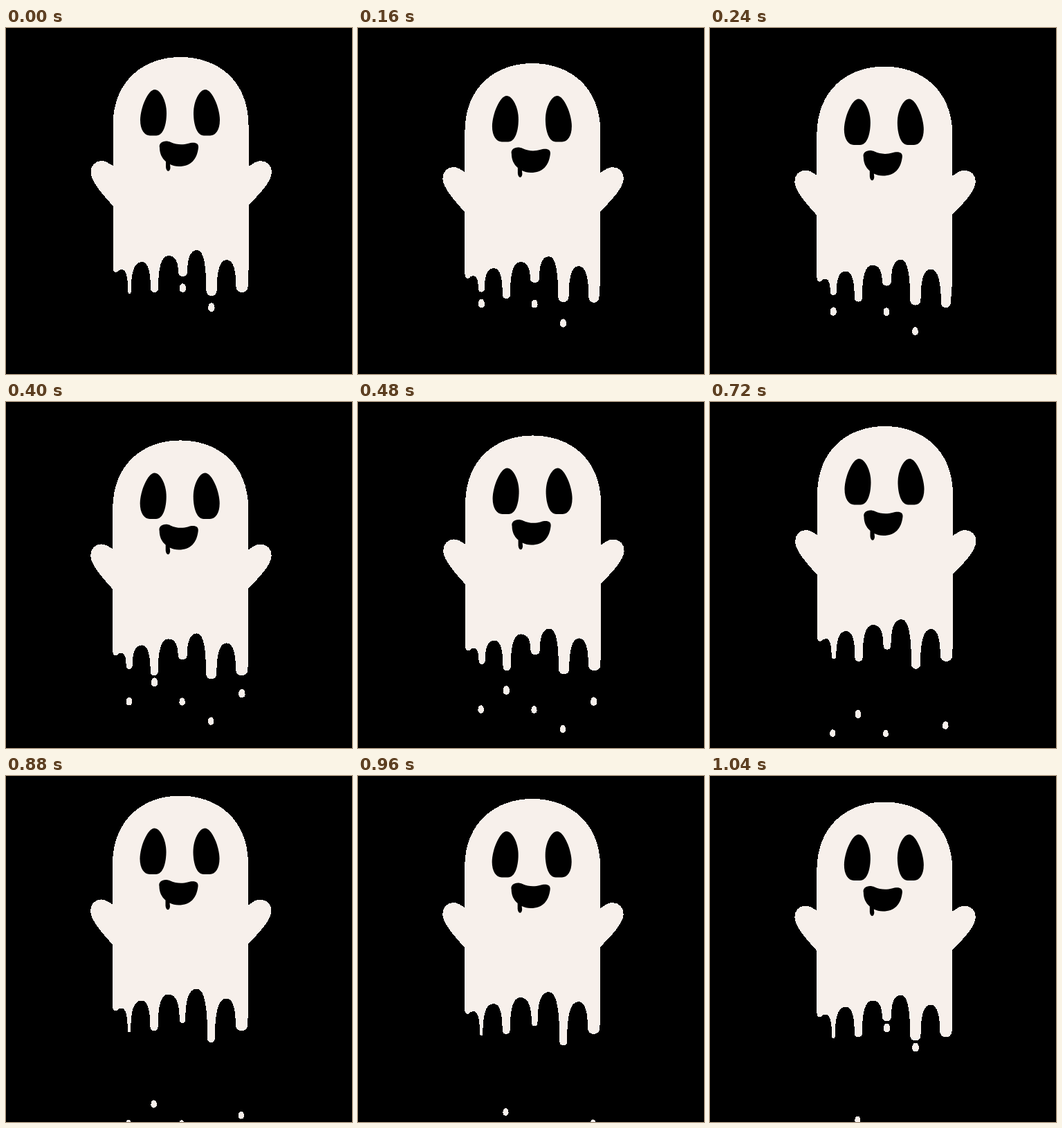
An HTML page that plays this animation: 500 px wide and 500 px high, repeating every 1120 ms.

```html
<!DOCTYPE html>
<html lang="en">
<head>
<meta charset="utf-8">
<title>Dripping ghost</title>
<style>
  html, body { margin: 0; width: 100%; height: 100%; overflow: hidden; background: #000; }
  svg { display: block; width: 100%; height: 100%; }
  .slime { fill: #f7f0eb; shape-rendering: crispEdges; }
</style>
</head>
<body>
<svg viewBox="0 0 500 500">
  <g id="drops"></g>
  <g id="ghost">
    <path id="body" class="slime"/>
    <path id="eye" d="M215 89C205 89 194 116 194 133C194 147 200 155.5 208 155.5L217 155.5C227 155.5 232 140 232 123C232 105 223 89 215 89Z"/>
    <use href="#eye" transform="matrix(-1 0 0 1 503 0)"/>
    <path d="M222 173C220 165 230 161 238 165C246 169 256 169 263 167C272 164 279 166 278 173C276 190 267 200 250 200C245 200 241 199 237 197L237.5 202C237 209 231.5 208 231 201L231 193C225 188 222 181 222 173Z"/>
  </g>
</svg>
<script>
const STEP_MS = 80, STEPS = 14;
const FALL_SPEED = 11.5, DROP_GAP = 9.5;
const STRETCH = 11.5, STRETCH_STEPS = 4;

// Turning points as [step, offset]
const bobKeys = [[-3, -13.5], [4.2, 19], [7, -0.5], [11, -13.5], [18.2, 19]];
const swayKeys = [[0, 0], [5, -0.3], [7, 1.5], [11, -0.5], [14, 0]];

// tip: resting length, arch: height of the gap to its left,
// release: step when the drop lets go, lead: steps of stretching before that
const drips = [
  { x: 178.5, tip: 372.5, arch: 349, release: 1, lead: 8 },
  { x: 214.5, tip: 382, arch: 338, release: 5, lead: 2 },
  { x: 255.5, tip: 359, arch: 329, release: 13, lead: 6 },
  { x: 297, tip: 387, arch: 321, release: 13, lead: 6 },
  { x: 341, tip: 382, arch: 335, release: 4, lead: 4 }
];

const lerp = (a, b, k) => a + (b - a) * k;
const clamp01 = v => Math.min(1, Math.max(0, v));
const wrap = step => (step + STEPS) % STEPS;

function track(keys, t) {
  const i = keys.findIndex(([time]) => time > t);
  const [t0, v0] = keys[i - 1], [t1, v1] = keys[i];
  return lerp(v0, v1, (t - t0) / (t1 - t0));
}

const ghost = document.getElementById("ghost");
const body = document.getElementById("body");
const dropLayer = document.getElementById("drops");

drips.forEach((drip, i) => {
  drip.half = 4.5 + i * 1.05;
  drip.archX = ((i ? drips[i - 1].x : 156) + drip.x) / 2;
  drip.drop = document.createElementNS("http://www.w3.org/2000/svg", "path");
  drip.drop.setAttribute("class", "slime");
  dropLayer.append(drip.drop);
});

function stretchAt({ release, lead }, step) {
  const left = wrap(release - step);
  return left ? STRETCH * clamp01((lead - left) / STRETCH_STEPS) : 0;
}

function bodyPath(step) {
  let d = "M154.5 346L154.5 257C140 241 123 222 122.5 209C122 196 134 188 146 194L154.5 199" +
    "L154.5 140C155 75 200 42 252 42C305 42 350 75 350.5 140L350.5 200L360 194" +
    "C373 188 385 197 384 209C383 223 366 240 350.5 256L350.5 350";
  // Trace the fringe from right to left
  for (let i = drips.length - 1; i >= 0; i--) {
    const drip = drips[i], next = drips[i + 1];
    const stretch = stretchAt(drip, step);
    const tip = drip.tip + stretch;
    const half = drip.half - stretch * 0.2;
    const left = drip.x - half, right = drip.x + half;
    const shoulder = tip - half, round = tip + half * 0.33;
    d += next
      ? `C${lerp(next.archX, right, 0.78)} ${next.arch} ${right} ${lerp(next.arch, tip, 0.38)} ${right} ${shoulder}`
      : `L${right} ${shoulder}`;
    d += `C${right} ${round} ${left} ${round} ${left} ${shoulder}` +
      `C${left} ${lerp(drip.arch, tip, 0.38)} ${lerp(drip.archX, left, 0.78)} ${drip.arch} ${drip.archX} ${drip.arch}`;
  }
  return d + "L163 350C161 354 154.5 355 154.5 346Z";
}

function dropPath(x, y, r) {
  const top = y - r * 1.35, side = y + r * 0.27, bottom = y + r * 1.7;
  return `M${x} ${top}C${x + r * 0.8} ${top} ${x + r} ${y - r * 0.4} ${x + r} ${side}` +
    `C${x + r} ${bottom} ${x - r} ${bottom} ${x - r} ${side}` +
    `C${x - r} ${y - r * 0.4} ${x - r * 0.8} ${top} ${x} ${top}Z`;
}

function drawDrop({ x, tip, release, drop }, step) {
  const age = wrap(step - release);
  const y = tip + track(bobKeys, release) + DROP_GAP + FALL_SPEED * age;
  drop.setAttribute("d", dropPath(x - age * 0.15, y, 4.8 - age * 0.1));
}

function render(ms) {
  const step = Math.floor(ms / STEP_MS) % STEPS;
  ghost.setAttribute("transform", `translate(${track(swayKeys, step)} ${track(bobKeys, step)})`);
  body.setAttribute("d", bodyPath(step));
  drips.forEach(drip => drawDrop(drip, step));
}

const startTime = performance.now();
function tick() {
  render(performance.now() - startTime);
  requestAnimationFrame(tick);
}
tick();
</script>
</body>
</html>
```
